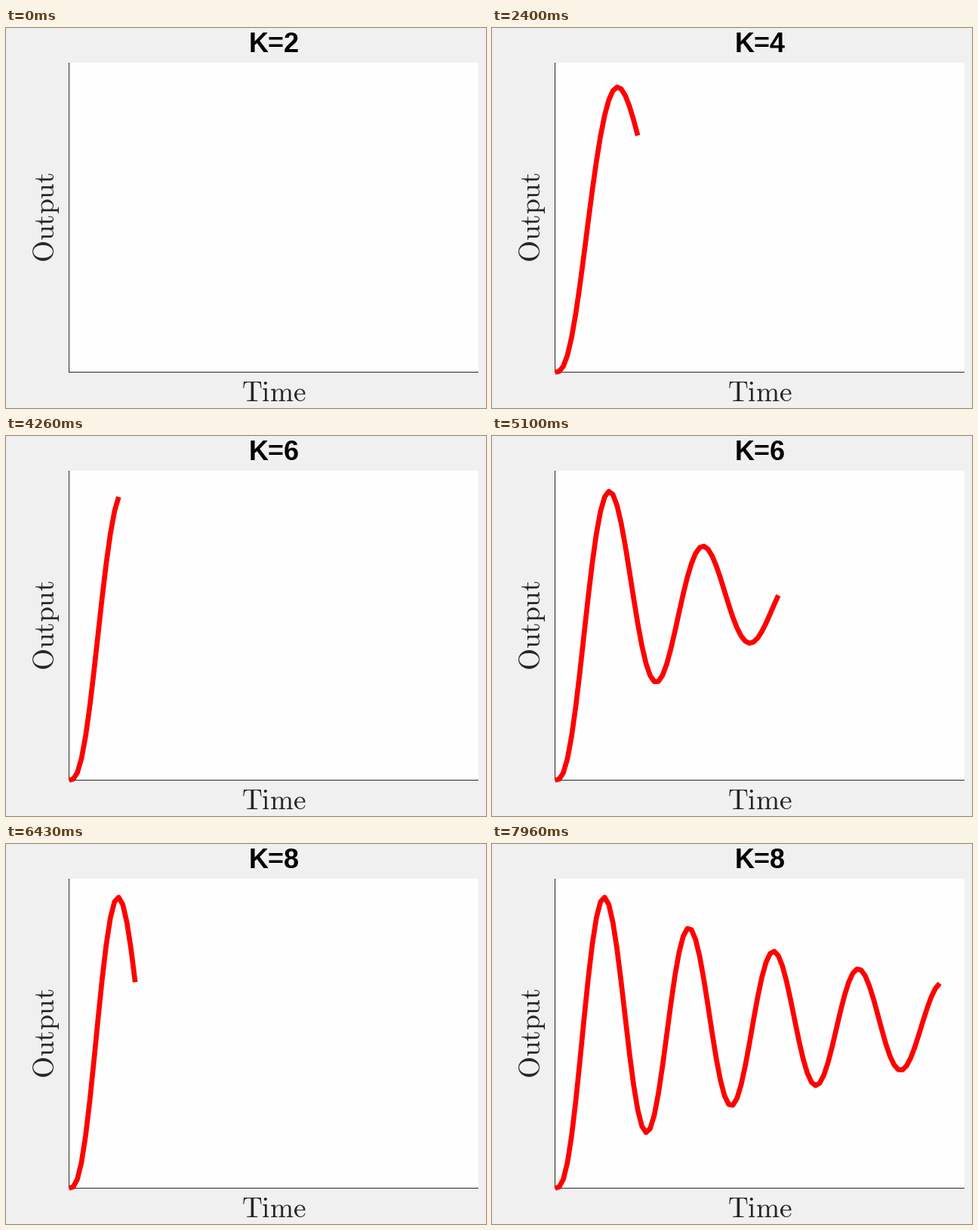
These frames come from a looping animation (636 by 504 pixels, 8000 ms). A matplotlib script:

```python
import numpy as np
import matplotlib.pyplot as plt
from matplotlib.animation import FuncAnimation

W, H, DPI = 636, 504, 96
LEFT, RIGHT, TOP, BASE = 83.5, 626, 46, 456.5
INTERVAL, FRAMES = 20, 400
TICK = 1000 / 30        # ms between visible updates
SAMPLE_MS = 20          # ms needed to draw one sample
TIMES = np.arange(100) * 0.1
STARTS = {2: -65, 4: 1997, 6: 4025, 8: 6105}   # gain -> start in ms
INK = "#262626"

plt.rcParams["mathtext.fontset"] = "cm"


def step_response(gain, t):
    """Unit step of the loop closed around 6K / ((s+1)(s+2)(s+3))."""
    den = [1, 6, 11, 6 * (1 + gain)]
    y = np.full(t.shape, gain / (1 + gain))
    for p in np.roots(den):
        residue = 6 * gain / (p * np.polyval(np.polyder(den), p))
        y = y + (residue * np.exp(p * t)).real
    return y


def make_curve(gain):
    y = step_response(gain, TIMES)
    x_px = LEFT + (RIGHT - LEFT) * TIMES / TIMES[-1]
    y_px = BASE - (BASE - TOP) * y / (y.max() + 0.1)
    return x_px, y_px


CURVES = {gain: make_curve(gain) for gain in STARTS}

fig = plt.figure(figsize=(W / DPI, H / DPI), dpi=DPI, facecolor="#f0f0f0")
ax = fig.add_axes([0, 0, 1, 1])
ax.set(xlim=(0, W), ylim=(H, 0))
ax.axis("off")


def box(x, y, w, h, color):
    ax.add_patch(plt.Rectangle((x, y), w, h, fc=color, lw=0))


def label(x, y, text, **style):
    return ax.text(x, y, text, ha="center", va="baseline", **style)


box(83, TOP, 543, 411, "#fefefe")
box(83, TOP, 1, 411, INK)
box(83, 456, 543, 1, INK)

label(355, 495, r"$\mathrm{Time}$", size=28, color=INK)
label(64, 250.5, r"$\mathrm{Output}$", size=28, color=INK,
      rotation=90, rotation_mode="anchor")
title = label(355, 32, "", size=27, color="black", weight="bold",
              family="Liberation Sans")
line, = ax.plot([], [], color="red", lw=5, solid_capstyle="butt",
                solid_joinstyle="round", clip_on=False)


def update(frame):
    tick = int((frame + 0.7) * INTERVAL / TICK)
    now = tick * TICK
    gain = max(k for k, start in STARTS.items() if start <= now)
    last = round((now - STARTS[gain]) / SAMPLE_MS)
    count = last + 1 if tick else 0     # the loop opens on an empty plot
    x, y = CURVES[gain]
    line.set_data(x[:count], y[:count])
    title.set_text(f"K={gain}")
    return line, title


anim = FuncAnimation(fig, update, frames=FRAMES, interval=INTERVAL,
                     init_func=lambda: update(0), repeat=True,
                     repeat_delay=0, blit=False)
plt.show()
```
